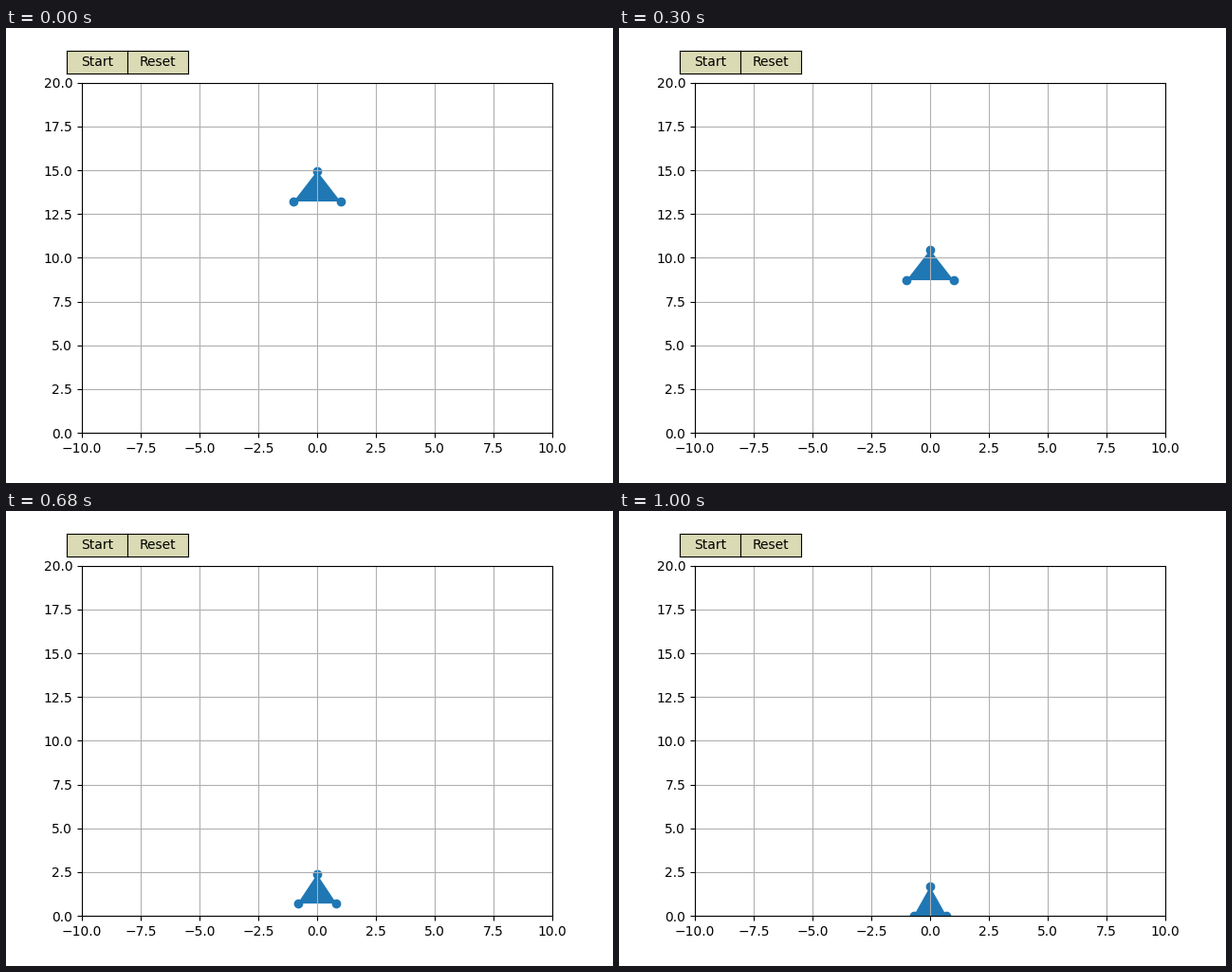
Animation, 640 px wide and 480 px high, one loop 1.02 s. Source, as a matplotlib script:

```python
import numpy as np
import matplotlib.pyplot as plt
from matplotlib.animation import FuncAnimation

LOOP_MS, TICK_MS, POSE_MS = 1020, 10, 25
GRAVITY, STIFFNESS, REST = 9.75, 200.0, 2.0
POSE_TIME, SUBSTEPS = 0.08, 200     # simulated seconds per pose
BLUE, KHAKI = "#1f77b4", "#dadab4"


def simulate(count):
    """Drop a triangle of three unit masses joined by springs onto the floor."""
    dt = POSE_TIME / SUBSTEPS
    height = REST * np.sqrt(3) / 2
    top = 14.946
    pos = np.array([[0, top], [-1, top - height], [1, top - height]])
    vel = np.zeros_like(pos)
    poses = [pos.copy()]
    for _ in range(count - 1):
        for _ in range(SUBSTEPS):
            edge = np.roll(pos, -1, axis=0) - pos
            length = np.sqrt((edge ** 2).sum(axis=1, keepdims=True))
            pull = STIFFNESS * (length - REST) * edge / length
            acc = pull - np.roll(pull, 1, axis=0)
            acc[:, 1] -= GRAVITY
            vel += acc * dt
            pos += vel * dt
            landed = pos[:, 1] < 0
            pos[landed, 1] = 0
            vel[landed, 1] = 0
        poses.append(pos.copy())
    return poses


def add_button(fig, left, label):
    box = fig.add_axes([left, 0.9, 0.1, 0.05], facecolor=KHAKI)
    box.set(xticks=[], yticks=[])
    box.text(0.5, 0.5, label, ha="center", va="center",
             transform=box.transAxes)


plt.rcParams["font.family"] = "DejaVu Sans"
fig = plt.figure(figsize=(6.4, 4.8), dpi=100, facecolor="white")
ax = fig.add_axes([0.125, 0.11, 0.775, 0.77])
ax.set(xlim=(-10, 10), ylim=(0, 20))
ax.grid(True)
add_button(fig, 0.1, "Start")
add_button(fig, 0.2, "Reset")

poses = simulate((LOOP_MS - 1) // POSE_MS + 1)
body = plt.Polygon(poses[0], facecolor=BLUE, edgecolor="none")
ax.add_patch(body)
joints = ax.scatter(*poses[0].T, color=BLUE)


def update(tick):
    pose = poses[tick * TICK_MS // POSE_MS]
    body.set_xy(pose)
    joints.set_offsets(pose)
    return body, joints


anim = FuncAnimation(fig, update, frames=LOOP_MS // TICK_MS,
                     interval=TICK_MS, repeat=True, repeat_delay=0)
plt.show()
```
